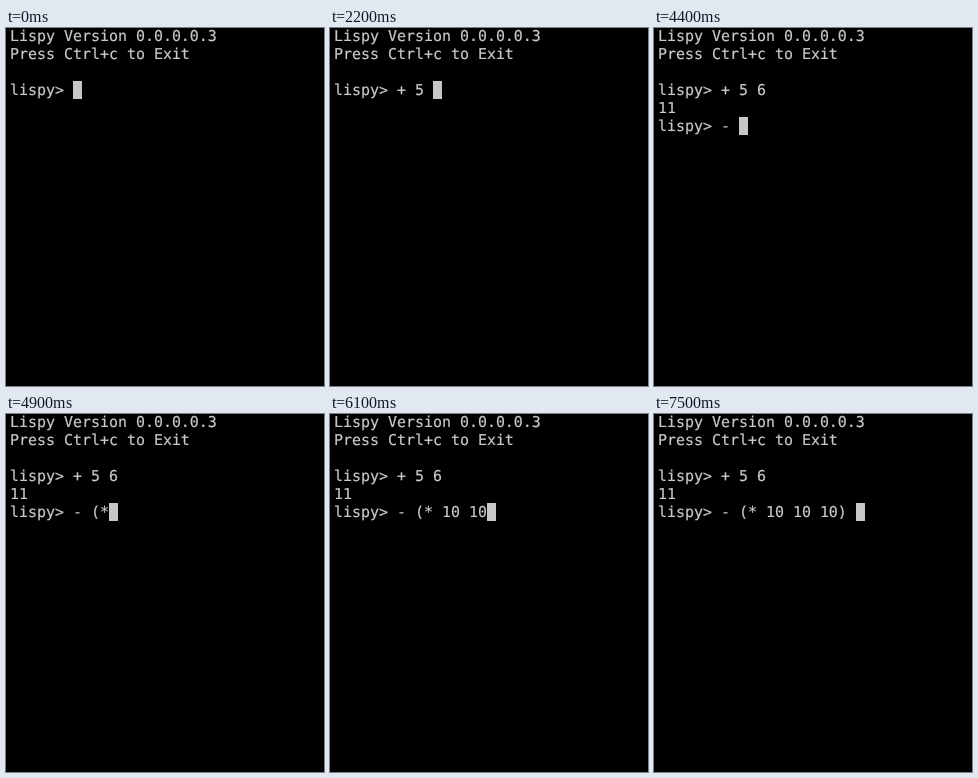
An HTML page for the animation above (8 s loop, 318x358 px).

```html
<!DOCTYPE html>
<html lang="en">
<head>
<meta charset="utf-8">
<title>Lispy session</title>
<style>
  html, body { margin: 0; width: 100%; height: 100%; overflow: hidden; background: #000; }
  svg { display: block; width: 318px; height: 358px; }
  text {
    font: 14.95px "DejaVu Sans Mono", monospace;
    fill: #c9c9c9;
    stroke: #c9c9c9;
    stroke-width: 0.2px;
    white-space: pre;
    text-rendering: geometricPrecision;
  }
</style>
</head>
<body>
<svg id="term" viewBox="0 0 318 358">
  <rect width="318" height="358" fill="#000"/>
  <rect id="cursor" width="9" height="18" fill="#c7c7c7"/>
</svg>
<script>
const LOOP = 8000, CELL = 9, ROW = 18, LEFT = 4, TOP = -1;
const PROMPT = 'lispy> ';
const INTRO = 'Lispy Version 0.0.0.0.3\nPress Ctrl+c to Exit\n\n' + PROMPT;

// [time in ms, text added to the terminal]
const KEYS = [
  [1300, '+'], [1600, ' '], [2000, '5'], [2200, ' '], [2700, '6'],
  [3300, '\n11\n' + PROMPT],
  [4100, '-'], [4400, ' '], [4700, '('], [4900, '*'], [5100, ' '],
  [5500, '1'], [5600, '0'], [5700, ' '],
  [6000, '1'], [6100, '0'], [6400, ' '],
  [6600, '1'], [6700, '0'], [7000, ')'], [7500, ' ']
];

const term = document.getElementById('term');
const cursor = document.getElementById('cursor');
const rows = Array.from({ length: 6 }, (_, i) => {
  const row = document.createElementNS('http://www.w3.org/2000/svg', 'text');
  row.setAttribute('x', LEFT);
  row.setAttribute('y', TOP + i * ROW + 14);
  return term.appendChild(row);
});
let shown = '';

function render(t) {
  const screen = INTRO + KEYS.filter(k => k[0] <= t).map(k => k[1]).join('');
  if (screen === shown) return;
  shown = screen;
  const lines = screen.split('\n');
  rows.forEach((row, i) => { row.textContent = lines[i] || ''; });
  const last = lines.length - 1;
  cursor.setAttribute('x', LEFT + lines[last].length * CELL);
  cursor.setAttribute('y', TOP + last * ROW);
}

let start;
function tick(now) {
  if (start === undefined) start = now;
  render((now - start) % LOOP);
  requestAnimationFrame(tick);
}
render(0);
requestAnimationFrame(tick);
</script>
</body>
</html>
```
